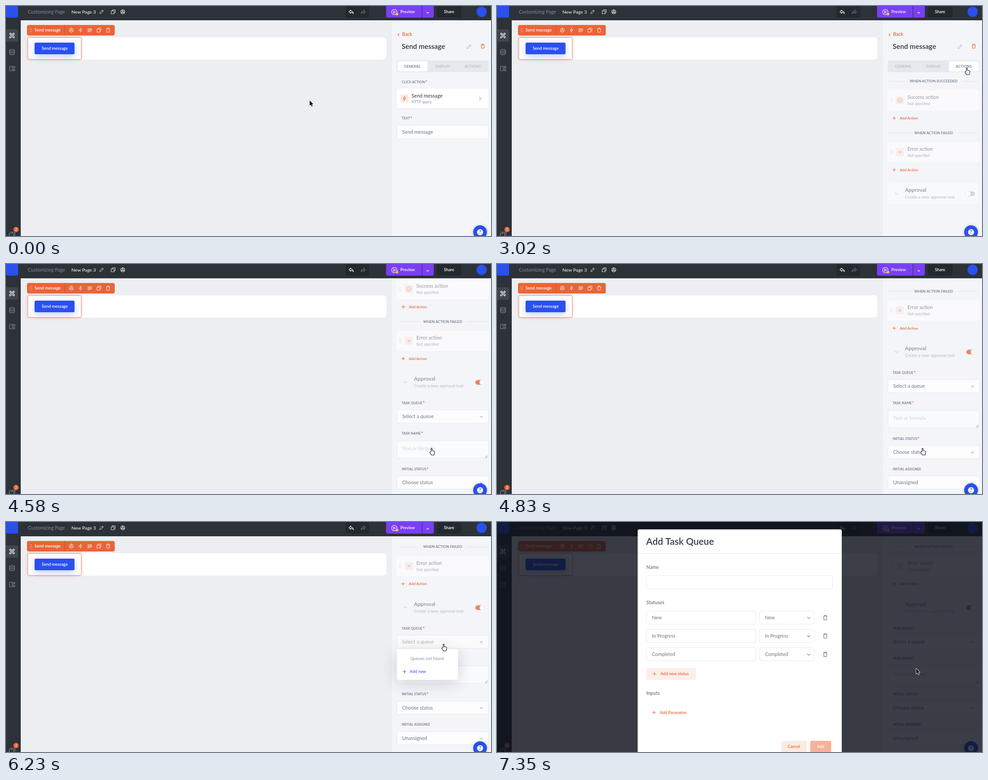
Write an HTML page with a canvas that moves like this. It is 1086 px wide and 515 px high and loops after 8 s.

```html
<!DOCTYPE html>
<html lang="en">
<head>
<meta charset="utf-8">
<title>Page builder</title>
<style>
html, body { margin: 0; width: 100%; height: 100%; overflow: hidden; background: #edeef2; }
canvas { display: block; width: 1086px; height: 515px; }
</style>
</head>
<body>
<canvas id="stage"></canvas>
<script>
const W = 1086, H = 515, LOOP = 8000;
const canvas = document.getElementById('stage');
const ctx = canvas.getContext('2d');
const dpr = window.devicePixelRatio || 1;
canvas.width = W * dpr;
canvas.height = H * dpr;

const ORANGE = '#ea6437', BLUE = '#2a50ee', PURPLE = '#7a3ff2';
const DARK = '#2c3238', DARKER = '#23292e', INK = '#2d343b';
const GREY = '#6b7681', SOFT = '#9aa2ab', LINE = '#e7e9ee';

const ICON = {
  pencil: 'M-4 4l.7-2.8L2-4.1 4.1-2-1.2 3.3z M.8-2.9L2.9-.8',
  copy: 'M-4.5-2h6.5v6.5h-6.5z M-2-2v-2.5H4.5V2H2',
  gear: 'M-4.6 0L-3.6-3 0-4.8 3.6-3 4.6 0 3.6 3 0 4.8-3.6 3z M-1.5 0a1.5 1.5 0 1 0 3 0a1.5 1.5 0 1 0-3 0 M0-1.5V-4.8M1.3.8L3.6 3M-1.3.8L-3.6 3',
  bolt: 'M.8-4.8L-3.2 1H0L-.8 4.8 3.2-1H0z',
  lines: 'M-5-3H5M-5-.8H5M-5 1.4H5M-5 3.6H2',
  trash: 'M-4.2-3H4.2M-1.6-3v-1.7h3.2V-3M-3.2-3l.4 7.7h5.6l.4-7.7',
  undo: 'M-1-4.5L-5-.7-1 3V.8q4-.2 6 3.2-.5-6-6-6.3z',
  down: 'M-3-1.5L0 1.5 3-1.5',
  right: 'M-2-4L2 0-2 4',
  left: 'M1.5-3L-1.5 0 1.5 3',
  plus: 'M-3.8 0H3.8M0-3.8V3.8',
  cross: 'M-3-3L3 3M3-3L-3 3',
  check: 'M-5 0a5 5 0 1 0 10 0a5 5 0 1 0-10 0 M-2.2 0L-.5 1.8 2.4-1.6',
  tools: 'M-5.5-3.5l2-2 9 9-2 2z M5.5-3.5l-2-2L-5.5 3.5v2h2z',
  data: 'M-5.5-4a5.5 2 0 0 1 11 0a5.5 2 0 0 1-11 0V4a5.5 2 0 0 0 11 0V-4M-5.5 0a5.5 2 0 0 0 11 0',
  layout: 'M-5.5-5h6V5h-6z M3-5h3v3.5H3z M3 1.5h3V5H3z',
  stack: 'M-6-2H4v9H-6z M-4-4.5H6.5V3',
  play: 'M-6 0a6 6 0 1 0 12 0a6 6 0 1 0-12 0 M-1.7-2.6L2.5 0-1.7 2.6z',
  grip: 'M-1 4.5L4-.5M1.8 4.5L4 2.3'
};
const ARROW = new Path2D('M0 0V11.6L2.7 9.2 4.6 13.5 6.7 12.6 4.8 8.4H8.3z');
const HAND = new Path2D('M-1.2 7V.8a1.2 1.2 0 0 1 2.4 0V5l4.4 1q1.5.4 1.3 2l-.6 4-1 2.7H-.4L-3.8 9.6q-.8-1.7.6-2.1z');

const clamp = v => Math.max(0, Math.min(1, v));
const span = (t, a, b) => clamp((t - a) / (b - a));
const mix = (a, b, p) => a + (b - a) * p;
const easeInOut = p => p < .5 ? 4 * p ** 3 : 1 - 4 * (1 - p) ** 3;
const easeOut = (p, n) => 1 - (1 - p) ** n;

function text(s, x, y, size, color, weight = 400, align = 'left') {
  ctx.font = `${weight} ${size}px Lato, "Open Sans", sans-serif`;
  ctx.textAlign = align;
  ctx.fillStyle = color;
  ctx.fillText(s, x, y + size * .36);
}

function box(x, y, w, h, r, fill, stroke, shadow) {
  ctx.save();
  ctx.beginPath();
  ctx.roundRect(x, y, w, h, r);
  if (shadow) {
    ctx.shadowColor = shadow[0];
    ctx.shadowBlur = shadow[1] * dpr;
    ctx.shadowOffsetY = shadow[2] * dpr;
  }
  if (fill) { ctx.fillStyle = fill; ctx.fill(); }
  ctx.shadowColor = 'transparent';
  if (stroke) { ctx.strokeStyle = stroke; ctx.lineWidth = 1; ctx.stroke(); }
  ctx.restore();
}

function disc(x, y, r, color) {
  ctx.beginPath();
  ctx.arc(x, y, r, 0, 7);
  ctx.fillStyle = color;
  ctx.fill();
}

function icon(name, x, y, color, width = 1, scale = 1) {
  ctx.save();
  ctx.translate(x, y);
  ctx.scale(scale, scale);
  ctx.strokeStyle = color;
  ctx.lineWidth = width / scale;
  ctx.lineJoin = 'round';
  ctx.stroke(new Path2D(ICON[name]));
  ctx.restore();
}

function dots(x, y, color) {
  ctx.fillStyle = color;
  for (let i = 0; i < 6; i++) ctx.fillRect(x + (i % 2) * 3, y - 4 + (i >> 1) * 3.4, 1.3, 1.3);
}

function faded(alpha, draw) {
  ctx.save();
  ctx.globalAlpha *= alpha;
  draw();
  ctx.restore();
}

function topBar() {
  box(0, 0, W, 32, 0, DARK);
  box(0, 0, 27, 26, [0, 0, 4, 4], BLUE);
  text('Customizing Page', 49, 13, 10.7, '#858c93');
  text('New Page 3', 146.5, 13, 10.4, '#fff');
  icon('pencil', 214, 13, '#d8dbde');
  icon('copy', 240, 13, '#e4e6e8');
  icon('gear', 261.5, 13, '#e4e6e8', 1.2);
  box(760, 0, 53, 26, [0, 0, 3, 3], DARKER);
  icon('undo', 773, 13.5, '#fff', 1.1);
  ctx.save();
  ctx.translate(800, 13.5);
  ctx.scale(-1, 1);
  icon('undo', 0, 0, '#6d747b', 1.1);
  ctx.restore();
  box(851, 0, 80, 26, [0, 0, 0, 4], PURPLE);
  box(932, 0, 26, 26, [0, 0, 4, 0], PURPLE);
  icon('play', 869.5, 13.5, '#fff', 1.1);
  disc(875.5, 18, 3, '#f6c443');
  text('Preview', 883, 13, 9.1, '#fff', 600);
  icon('down', 944.5, 15, '#fff', 1.2, .85);
  box(965, 0, 55, 26, [0, 0, 4, 4], DARKER);
  text('Share', 992, 13, 9.3, '#fff', 600, 'center');
  disc(1065, 13, 11.5, BLUE);
}

function sideBar() {
  box(0, 32, 33, H - 32, 0, DARK);
  box(0, 52, 27, 28, [0, 4, 4, 0], '#40464d');
  icon('tools', 13.5, 66, '#fff', 1.2);
  icon('data', 13.5, 103, '#8b9299', 1.1);
  icon('layout', 13.5, 140, '#8b9299', 1.1);
  icon('stack', 13.5, 511, '#8b9299', 1.1);
  disc(22.5, 500.5, 6, ORANGE);
  text('2', 22.5, 500.5, 8, '#fff', 400, 'center');
}

function workspace() {
  box(33, 32, 831, H - 32, 0, '#edeef2');
  box(48, 70, 804, 50, 8, '#fff');
  box(49, 70.5, 119.5, 49, 3, '#fff', '#ee9677', ['rgba(234,100,55,.6)', 5, 0]);
  box(64, 82, 89.5, 26, 3, BLUE, null, ['rgba(42,80,238,.28)', 16, 5]);
  text('Send message', 109, 94.5, 9.35, '#fff', 600, 'center');
  box(47, 42.5, 196.5, 23.5, 4, ORANGE);
  box(131, 42.5, 1, 23.5, 0, '#d3552b');
  dots(53.5, 54, '#f9cdbd');
  text('Send message', 64, 54, 9.35, '#fff', 600);
  ['gear', 'bolt', 'lines', 'copy', 'trash'].forEach((name, i) =>
    icon(name, 146.3 + i * 20.6, 54, '#fde9e2'));
}

function label(s, y, required) {
  text(s, 886, y, 7.6, GREY, 600);
  if (required) {
    const w = ctx.measureText(s).width;
    text('*', 886.5 + w, y + 1, 11, ORANGE, 600);
  }
}

function select(s, y, open) {
  box(875.5, y, 205, 29.5, 4, open ? '#fbfbfc' : '#fdfdfe', LINE);
  text(s, 887, y + 14.5, 11.1, open ? '#a9afb7' : GREY);
  icon('down', 1064.5, y + 15.5, SOFT, 1.1);
}

function panelHead(tab) {
  icon('left', 879, 64.5, ORANGE, 1.2);
  text('Back', 887, 63.5, 10.4, ORANGE, 600);
  text('Send message', 886, 90, 15.6, INK, 600);
  icon('pencil', 1036.5, 91, '#a9b0b8', 1, 1.1);
  icon('trash', 1067.5, 90, ORANGE, 1.1);
  box(875, 122, 206, 26, 4, '#e6e8ed');
  box(tab ? 1012 : 877, 124, 67, 22.5, 4, '#fff');
  [['GENERAL', 909.7], ['DISPLAY', 977.7], ['ACTIONS', 1045]].forEach(([s, x], i) =>
    text(s, x, 135, 8.3, i === tab ? GREY : '#b3b9c1', 600, 'center'));
}

function generalTab() {
  label('CLICK ACTION', 170, true);
  box(875, 185, 205.5, 44, 4, '#fff', null, ['rgba(40,50,70,.06)', 3, 1]);
  box(883, 198, 18, 18, 3, '#fbe8e1');
  icon('bolt', 892, 207, ORANGE, 1);
  text('Send message', 908, 201, 11.2, INK);
  text('HTTP query', 908, 215, 8.5, '#87909a');
  icon('right', 1061.5, 207.5, '#a6adb5', 1.1);
  label('TEXT', 251.5, true);
  box(875.5, 267, 205, 30, 4, '#fdfdfe', LINE);
  text('Send message', 887, 282, 11.2, GREY);
}

function divider(s, y, inset) {
  text(s, 977.7, y, 8.05, GREY, 600, 'center');
  box(879, y - .5, inset, 1, 0, '#dfe2e7');
  box(1077 - inset, y - .5, inset, 1, 0, '#dfe2e7');
}

function actionCard(title, name, y) {
  box(875, y, 205.5, 43.5, 4, 'rgba(255,255,255,.55)', 'rgba(255,255,255,.6)');
  faded(.6, () => {
    dots(881, y + 21.5, '#a9b0b8');
    box(893, y + 12.5, 18, 18, 3, '#f3e7e5');
    icon(name, 902, y + 21.5, ORANGE);
    text(title, 919, y + 15, 11, '#4b555f');
    text('Not specified', 919, y + 29.5, 8.65, '#7d8690');
  });
}

function addAction(y) {
  icon('plus', 889.3, y, ORANGE, 1.1);
  text('Add Action', 902, y, 8.2, ORANGE, 600);
}

function approval(on) {
  if (!on) box(875, 397, 205.5, 46, 4, 'rgba(255,255,255,.35)');
  icon('down', 894.5, 420, '#b3b9c0', 1, 1.1);
  text('Approval', 913.5, 412, 12, '#8b939c', 600);
  text('Create a new approval task', 913.5, 428, 9.45, '#b4bac2');
  box(1051, 415, 19, 10.5, 5.2, on ? '#ee8361' : '#d5d9de');
  ctx.save();
  ctx.shadowColor = 'rgba(0,0,0,.18)';
  ctx.shadowBlur = 2 * dpr;
  disc(on ? 1065.5 : 1055.5, 420.2, 5.3, '#fff');
  ctx.restore();
}

function actionsTab(on, open) {
  divider('WHEN ACTION SUCCEEDED', 168.5, 35);
  actionCard('Success action', 'check', 189.5);
  addAction(251);
  divider('WHEN ACTION FAILED', 284, 46);
  actionCard('Error action', 'cross', 305.5);
  addAction(367);
  approval(on);
  if (!on) return;
  label('TASK QUEUE', 466.5, true);
  select('Select a queue', 481.8, open);
  label('TASK NAME', 534, true);
  box(875.5, 551, 205, 39, 4, '#fafbfc', LINE);
  text('Text or formula', 887, 568.5, 11, '#d0d4da');
  icon('grip', 1074, 584.5, '#747b83');
  label('INITIAL STATUS', 614, true);
  select('Choose status', 629.7);
  label('INITIAL ASSIGNEE', 682);
  select('Unassigned', 697.7);
}

function panel(t, scroll, open) {
  const tab = t < 2300 ? 0 : 2;
  ctx.save();
  ctx.beginPath();
  ctx.rect(864, 32, W - 864, H - 32);
  ctx.clip();
  box(864, 32, W - 864, H - 32, 0, '#f4f5f9');
  ctx.translate(0, -scroll);
  panelHead(tab);
  if (tab) actionsTab(t >= 3940, open);
  else generalTab();
  ctx.restore();
}

function dropdown(hover) {
  box(875, 284, 137, 69.5, 4, '#fff', null, ['rgba(40,48,70,.2)', 34, 8]);
  text('Queues not found', 943, 305.5, 9.4, '#87909a', 400, 'center');
  if (hover) box(875, 321.5, 137, 26, 0, '#5570e8');
  icon('plus', 892.5, 335, hover ? '#cfd8fb' : BLUE);
  text('Add new', 904, 334.5, 9.4, hover ? '#fff' : BLUE);
}

function helpButton() {
  ctx.save();
  ctx.shadowColor = 'rgba(0,0,0,.18)';
  ctx.shadowBlur = 6 * dpr;
  disc(1061.5, 506.5, 15.5, BLUE);
  ctx.restore();
  disc(1061.5, 506.5, 6.7, '#fff');
  text('?', 1061.5, 506.5, 10.5, BLUE, 700, 'center');
}

function modal() {
  box(315, 16.5, 457, 520, 4, '#fff');
  text('Add Task Queue', 334, 43, 21, '#343b44', 600);
  box(315, 70, 457, 1, 0, LINE);
  text('Name', 334.5, 101, 10.6, GREY, 600);
  box(334.5, 120, 417, 30, 4, '#fff', LINE);
  text('Statuses', 334.5, 180, 10.8, GREY, 600);
  ['New', 'In Progress', 'Completed'].forEach((s, i) => {
    const y = 199.2 + i * 41.1;
    box(334.5, y, 245, 29.6, 4, '#fff', LINE);
    text(s, 347, y + 14.8, 10.8, GREY);
    box(588, y, 122, 29.6, 4, '#fff', LINE);
    text(s, 600, y + 14.6, 10.8, GREY);
    icon('down', 698, y + 15.3, GREY, 1.1, 1.1);
    icon('trash', 735, y + 14.8, GREY, 1.1, 1.1);
  });
  box(334.5, 327, 111, 26.5, 3, '#fceee9');
  icon('plus', 352.5, 340, ORANGE, 1.2);
  text('Add new status', 366, 340, 9.25, ORANGE, 600);
  text('Inputs', 334.5, 383.5, 10.8, GREY, 600);
  icon('plus', 351.8, 426.5, ORANGE, 1.2);
  text('Add Parameter', 364.5, 426.5, 9.1, ORANGE, 600);
  box(636.5, 490, 57, 26, 3, '#fceae4');
  text('Cancel', 665, 503, 9.2, ORANGE, 600, 'center');
  box(701.5, 490, 46.5, 26, 3, '#f6b29b', null, ['rgba(234,100,55,.16)', 10, 3]);
  text('Add', 724.7, 503, 9.2, '#fff', 600, 'center');
}

// Start, end and target of each pointer move
const MOVES = [
  [1160, 1950, 1052, 139, easeInOut],
  [3020, 3610, 953, 413, easeInOut],
  [5150, 5840, 980, 274, p => easeOut(p, 1.7)],
  [6580, 6910, 938.5, 328, easeInOut]
];

function pointer(t) {
  let x = 680, y = 211.5;
  for (const [a, b, tx, ty, ease] of MOVES) {
    const p = ease(span(t, a, b));
    x = mix(x, tx, p);
    y = mix(y, ty, p);
  }
  return { x, y };
}

function overLink(t, { x, y }) {
  if (x < 875 || t >= 7060) return false;
  const inside = zones => zones.some(([a, b]) => y >= a && y <= b);
  if (t < 2300) return inside([[124, 146], [185, 229]]);
  if (t < 4300) return inside([[124, 146], [190, 233], [306, 349], [397, 443]]);
  if (t < 5150) return true;
  return inside(t < 6110 ? [[253, 283], [401, 431]] : [[253, 283], [321.5, 347.5]]);
}

function drawPointer(t, pos) {
  const hand = overLink(t, pos);
  const shape = hand ? HAND : ARROW;
  ctx.save();
  ctx.translate(pos.x, pos.y);
  ctx.lineJoin = 'round';
  ctx.strokeStyle = hand ? '#111' : '#fff';
  ctx.lineWidth = hand ? 1.1 : 1.6;
  ctx.fillStyle = hand ? '#fff' : '#111';
  if (hand) ctx.fill(shape);
  ctx.stroke(shape);
  if (!hand) ctx.fill(shape);
  ctx.restore();
}

function render(t) {
  ctx.setTransform(dpr, 0, 0, dpr, 0, 0);
  const pos = pointer(t);
  const scroll = 228.5 * easeOut(span(t, 4300, 4910), 1.84);
  const open = t >= 6110 && t < 7240;
  workspace();
  topBar();
  sideBar();
  panel(t, scroll, open);
  if (open) faded(clamp((t - 6050) / 180), () => dropdown(t >= 6580 && pos.y >= 321.5));
  helpButton();
  if (t >= 7240) {
    faded(clamp((t - 7185) / 165), () => {
      box(0, 0, W, H, 0, 'rgba(12,15,26,.8)');
      modal();
    });
  }
  drawPointer(t, pos);
}

function tick() {
  render(performance.now() % LOOP);
  requestAnimationFrame(tick);
}
tick();
</script>
</body>
</html>
```
